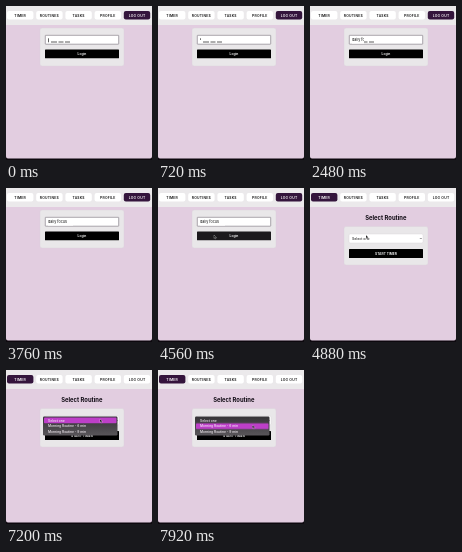
An HTML page that plays this animation: 146x154 px, repeating every 8000 ms.

```html
<!DOCTYPE html>
<html lang="en">
<head>
<meta charset="utf-8">
<title>Routine timer</title>
<style>
  html, body { margin: 0; width: 100%; height: 100%; overflow: hidden; background: #e2cde0; }
  svg { display: block; width: 146px; height: 154px; }
  text { font-family: Inter, Roboto, sans-serif; }
  .nav rect { fill: #fff; }
  .nav text { font-size: 3.4px; font-weight: 600; letter-spacing: .22px; text-anchor: middle; fill: #111; }
  .nav .on rect { fill: #34153c; }
  .nav .on text { fill: #fff; }
  .card { fill: #e9e7e9; stroke: #d9d0d9; stroke-width: .4; }
  .field { fill: #fff; stroke: #76707a; stroke-width: .6; }
  .picker { fill: #fff; stroke: #d4d0d5; stroke-width: .4; }
  .button { fill: #000; }
  .label { font-size: 3.3px; font-weight: 600; text-anchor: middle; fill: #fff; }
  .value { font-size: 3.7px; fill: #111; }
  .title { font-size: 5.85px; font-weight: 700; text-anchor: middle; fill: #0c0710; }
  .option { font-size: 3.3px; font-weight: 500; fill: #f4eef4; }

  .login, .timer, .menu, .caret, .entry, .pick, .hover, .typed { animation: 8s step-end infinite; }
  .login { animation-name: login; }
  .timer { animation-name: timer; }
  .menu { animation-name: menu; }
  .caret { animation-name: caret; }
  .entry { animation-name: entry; }
  .pick { animation-name: pick; }
  .hover { animation-name: hover; }
  .typed { animation-name: type; }
  .cursor { animation: move 8s infinite; }

  @keyframes login { 0% { visibility: visible } 61%, 100% { visibility: hidden } }
  @keyframes timer { 0% { visibility: hidden } 61%, 100% { visibility: visible } }
  @keyframes menu { 0% { visibility: hidden } 90%, 100% { visibility: visible } }
  @keyframes caret { 0% { height: 4px } 7% { height: 1.6px } 20%, 100% { height: 0 } }
  @keyframes entry { 0% { opacity: 1 } 59%, 100% { opacity: 0 } }
  @keyframes hover { 0% { fill: #000 } 54%, 100% { fill: #1c1a1d } }
  @keyframes pick { 0% { transform: none } 97%, 100% { transform: translateY(5.8px) } }
  @keyframes type {
    0% { width: 0 } 20% { width: 2px } 22% { width: 4px } 25% { width: 6px }
    29% { width: 10px } 31% { width: 12px } 34% { width: 14px } 40% { width: 17px }
    42% { width: 19px } 44% { width: 20.5px } 47%, 100% { width: 25px }
  }
  @keyframes move {
    0% { transform: translate(62px, 35px); opacity: 0; animation-timing-function: step-end }
    52% { transform: translate(62px, 35px); opacity: 1; animation-timing-function: steps(6, start) }
    58%, 62% { transform: translate(56px, 47px); opacity: 1; animation-timing-function: steps(4, start) }
    66%, 69% { transform: translate(116px, 109px); opacity: 1; animation-timing-function: steps(5, start) }
    74%, 76% { transform: translate(25px, 54px); opacity: 1; animation-timing-function: steps(4, start) }
    80%, 82% { transform: translate(72px, 55px); opacity: 1; animation-timing-function: steps(6, start) }
    88%, 96% { transform: translate(94px, 49px); opacity: 1; animation-timing-function: steps(4, start) }
    100% { transform: translate(94.5px, 55px); opacity: 1 }
  }
</style>
</head>
<body>
<svg viewBox="0 0 146 154">
  <defs>
    <linearGradient id="shade" x2="0" y2="1">
      <stop stop-color="#353337"/><stop offset="1" stop-color="#59565a"/>
    </linearGradient>
    <clipPath id="typed"><rect class="typed" x="42" y="31" height="6.8"/></clipPath>
  </defs>

  <rect width="146" height="154" fill="#e2cde0"/>
  <rect width="146" height="19" fill="#ebe9eb"/>

  <g class="login">
    <g class="nav" data-active="4"></g>
    <rect class="card" x="34" y="22" width="84" height="38" rx="2"/>
    <rect class="field" x="39.3" y="29.3" width="73.4" height="8.9" rx=".4"/>
    <g class="entry">
      <path d="M45 36h6m1.5 0h5m1.5 0h5" stroke="#333" stroke-width=".8"/>
      <rect class="caret" x="42.3" y="32.3" width=".7" height="4" fill="#222"/>
      <g clip-path="url(#typed)">
        <rect x="42" y="31" width="25" height="6.8" fill="#fff"/>
        <text class="value" x="42" y="35.4">daily focus</text>
      </g>
    </g>
    <rect class="button hover" x="39" y="43.5" width="74" height="8.8" rx=".6"/>
    <text class="label" x="76" y="49.1">Login</text>
  </g>

  <g class="timer">
    <g class="nav" data-active="0"></g>
    <text class="title" x="75.8" y="32.3">Select Routine</text>
    <rect class="card" x="34" y="38.5" width="84" height="38.5" rx="2"/>
    <rect class="picker" x="39" y="46" width="74" height="9" rx="1.2"/>
    <text class="value" x="42" y="51.6" style="font-size:3.5px">Select one</text>
    <path d="M109.8 50l1 1 1-1" fill="none" stroke="#333" stroke-width=".5"/>
    <rect class="button" x="39" y="61" width="74" height="9" rx=".6"/>
    <text class="label" x="76" y="66.8">START TIMER</text>
  </g>

  <g class="menu">
    <rect x="37" y="46.5" width="74.5" height="19" rx="1.2" fill="url(#shade)"/>
    <rect class="pick" x="38" y="47.6" width="72.5" height="5.6" rx=".8" fill="#bd3fc8"/>
    <text class="option" x="42" y="51.7">Select one</text>
    <text class="option" x="42" y="57.4">Morning Routine - 6 min</text>
    <text class="option" x="42" y="62.9">Morning Routine - 9 min</text>
  </g>

  <path class="cursor" d="M0 0v3.4l.8-.7.6 1.2.6-.3-.6-1.1h1.1z" fill="#000" stroke="#fff" stroke-width=".3"/>
  <path d="M0 150.5q0 2 2 2h142q2 0 2-2v3.5H0z" fill="#0d080e"/>
</svg>
<script>
  const tabs = ['TIMER', 'ROUTINES', 'TASKS', 'PROFILE', 'LOG OUT'];
  for (const nav of document.querySelectorAll('.nav')) {
    nav.innerHTML = tabs.map((name, i) => {
      const x = 1 + i * 29.2;
      const on = i === +nav.dataset.active ? 'on' : '';
      return `<g class="${on}"><rect x="${x}" y="5" width="26.4" height="8.6" rx="2"/>` +
        `<text x="${x + 13.2}" y="10.6">${name}</text></g>`;
    }).join('');
  }
</script>
</body>
</html>
```
